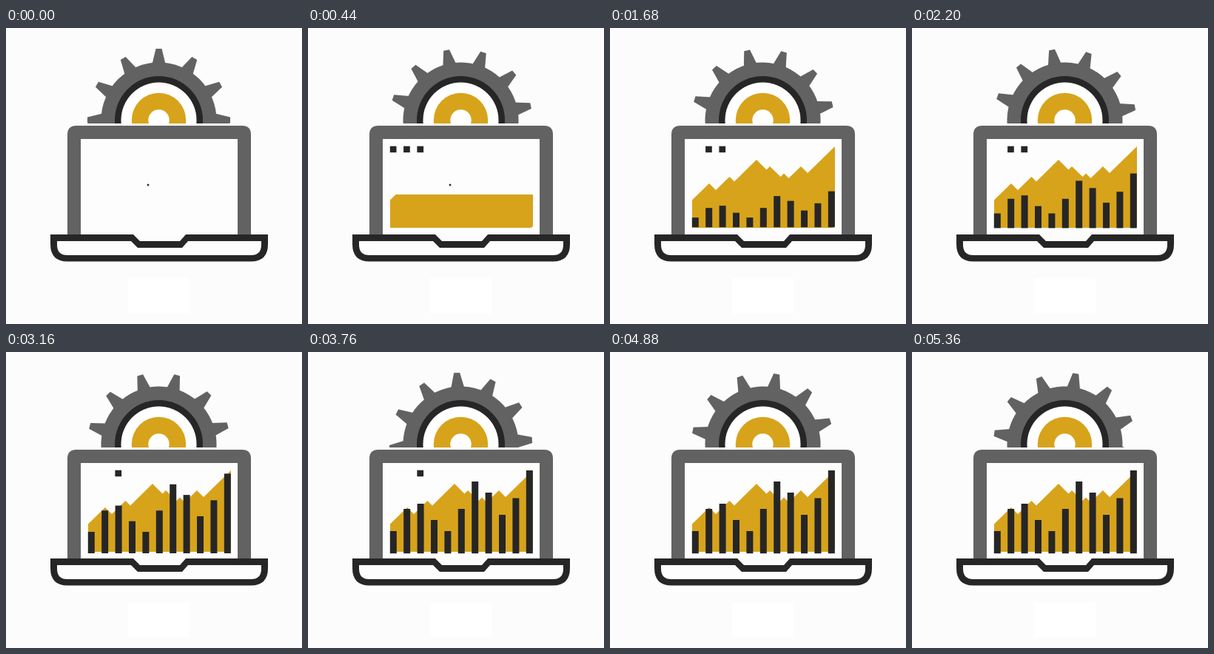
Recreate the animation shown at these times as an HTML page. Size 400 by 400 pixels, loop 5400 ms.

```html
<!DOCTYPE html>
<html lang="en">
<head>
<meta charset="utf-8">
<title>Laptop chart with gear</title>
<style>
  html, body { margin: 0; width: 100%; height: 100%; overflow: hidden; background: #fcfcfc; }
  svg { display: block; width: 100vw; height: 100vh; }
</style>
</head>
<body>
<svg viewBox="0 0 400 400">
  <defs>
    <clipPath id="horizon"><rect width="400" height="129"/></clipPath>
    <clipPath id="reveal"><rect id="wipe" x="105" width="205"/></clipPath>
  </defs>

  <rect x="165" y="338" width="83" height="48" fill="#fff"/>

  <g clip-path="url(#horizon)">
    <g transform="translate(206.5 124.5)">
      <g id="gear" fill="#626262"><circle r="78"/></g>
      <circle r="59.5" fill="#272626"/>
      <circle r="51" fill="#fff"/>
      <circle r="36.7" fill="#d7a31b"/>
      <circle r="14.2" fill="#fff"/>
    </g>
  </g>

  <path d="M83 280V144Q83 132 95 132H319Q331 132 331 144V280Z" fill="#626262"/>
  <rect x="101" y="150" width="212" height="130" fill="#fdfdfd"/>
  <circle cx="192" cy="212" r="1.5" fill="#333"/>

  <path clip-path="url(#reveal)" fill="#d7a31b"
    d="M111 232.500L134 210L143 219L161.500 201L168 207.500L198 178L211.500 191.500L216 187L230.500 201L235 196.500L241.500 203L258 187L267 196L304 160V266Q304 270 300 270H111Z"/>
  <g id="bars" fill="#272626"></g>
  <g id="squares" fill="#272626"></g>

  <path fill="#272626" d="M60 279H172L181 288H235L243 279H354V292Q354 315.500 331 315.500H83Q60 315.500 60 292Z"/>
  <path fill="#fdfdfd" d="M69 288H169L178 297H238L246 288H345V293Q345 307 331 307H83Q69 307 69 293Z"/>
</svg>

<script>
const LOOP = 5400, STEP = 40;
const BAR_ANCHOR = 267, BAR_BELOW = 5.2;
const barTops = [242, 212, 205, 227, 242, 212, 175, 190, 220, 197.5, 160];
const squareExits = [800, 2640, 4460];

const $ = id => document.getElementById(id);
const clamp = v => Math.min(1, Math.max(0, v));
const progress = (t, from, to) => clamp((t - from) / (to - from));
const easeSine = x => (1 - Math.cos(Math.PI * x)) / 2;

function add(parent, tag, attrs) {
  const el = document.createElementNS('http://www.w3.org/2000/svg', tag);
  for (const name in attrs) el.setAttribute(name, attrs[name]);
  return parent.appendChild(el);
}

for (let angle = 0; angle < 360; angle += 30) {
  add($('gear'), 'path', { d: 'M-9 -76L-4 -96.500H4L9 -76Z', transform: `rotate(${angle})` });
}

const bars = barTops.map((top, i) =>
  add($('bars'), 'rect', { x: 110.8 + i * 18.4, width: 9 }));

const squares = squareExits.map((_, i) =>
  add($('squares'), 'rect', { x: 110.8 + i * 18.3, y: 159.7, width: 8.7, height: 8.5 }));

function render(time) {
  const t = Math.floor(time / STEP) * STEP;

  const turn = t < 2 * STEP ? 0 : 0.12 * (t - STEP) + 0.4;
  $('gear').setAttribute('transform', `rotate(${turn})`);

  const rise = 111 * easeSine(progress(t, 80, 900));
  $('wipe').setAttribute('y', 270 - rise);
  $('wipe').setAttribute('height', rise + 1);

  const grow = easeSine(progress(t, 40, 3625));
  bars.forEach((bar, i) => {
    // every fifth bar after the first joins late
    const start = i && i % 5 === 0 ? 1240 : 640;
    const above = (BAR_ANCHOR - barTops[i]) * grow;
    bar.setAttribute('y', BAR_ANCHOR - above);
    bar.setAttribute('height', t < start ? 0 : above + BAR_BELOW * grow);
  });

  squares.forEach((square, i) => {
    const exit = squareExits[i];
    square.setAttribute('opacity', progress(t, 80, 280) * (1 - progress(t, exit, exit + 200)));
  });
}

const origin = performance.now();
function tick() {
  render((performance.now() - origin) % LOOP);
  requestAnimationFrame(tick);
}
tick();
</script>
</body>
</html>
```
